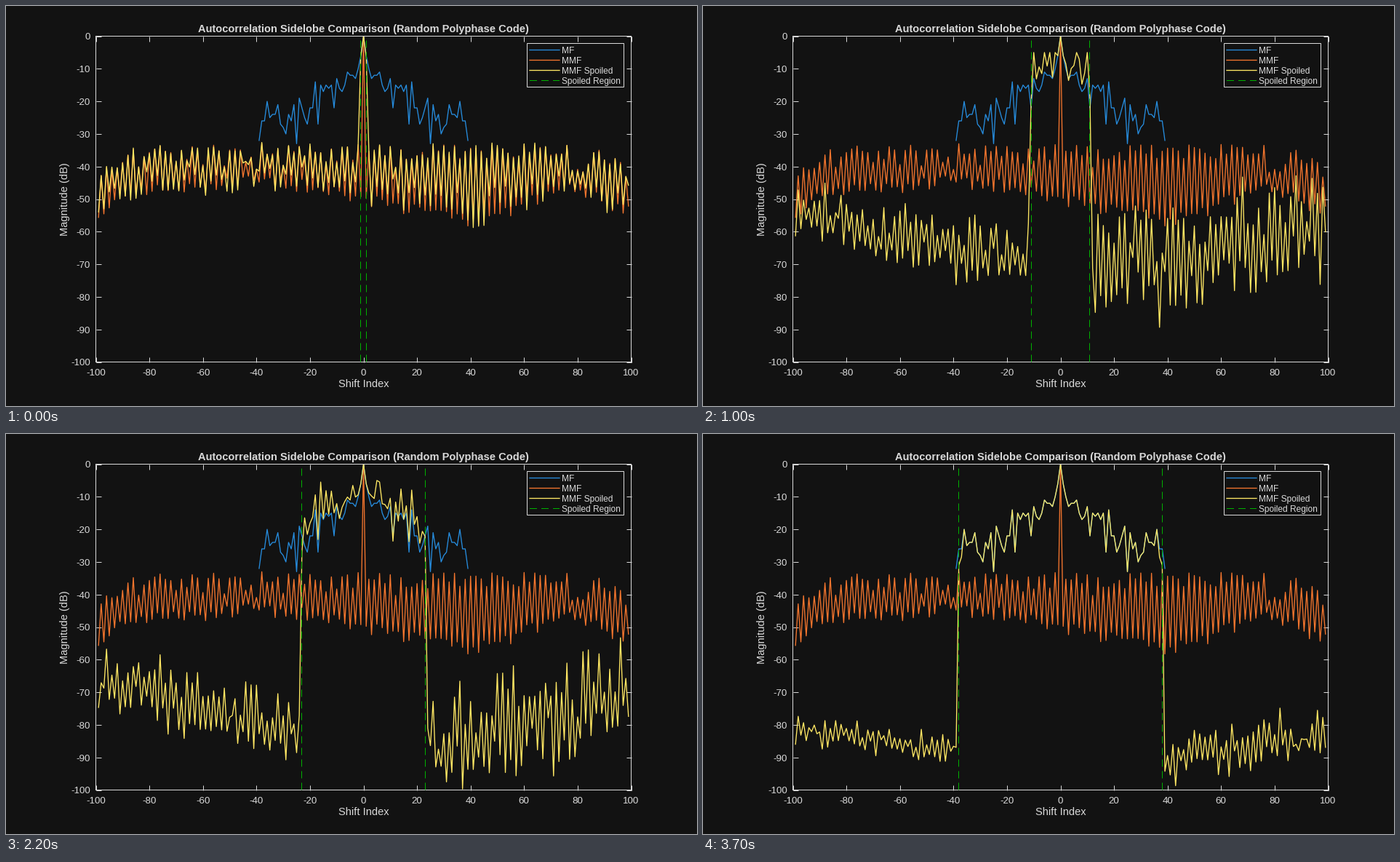
A matplotlib script for the animation above (3.8 s loop, 950 by 550 pixels).

```python
import numpy as np
import matplotlib.pyplot as plt
from matplotlib.animation import FuncAnimation
from matplotlib.patches import Rectangle

W, H = 950, 550
PX = 0.72  # one pixel in points at 100 dpi
BG, FG = "#121212", "#d9d9d9"
BLUE, ORANGE, YELLOW, GREEN = "#268cdd", "#f5762e", "#ffe864", "#00b000"
LEFT, RIGHT, TOP, BOTTOM = 123.5, 859.5, 41.5, 489.5
CENTER, STEP = (LEFT + RIGHT) / 2, (RIGHT - LEFT) / 200
STEPS = 38

plt.rcParams["font.family"] = "Liberation Sans"
rng = np.random.default_rng(12)
shift = np.arange(-99, 100)
lag = abs(shift)
even = shift % 2 == 0

# Matched filter: dB at shifts 0..39, mirrored around the peak.
mf_half = [0, -6, -10, -13, -12, -12, -11, -15, -17, -16,
           -13, -22, -15, -16, -15, -17, -15, -27, -14, -22,
           -22, -27, -25, -22, -19, -33, -21, -26, -24, -30,
           -28, -27, -21, -24, -24, -25, -20, -26, -26, -32]
mf = np.interp(lag, range(40), mf_half)
in_mf = lag < 40

# Mismatched filter: uneven teeth on even shifts over a smooth floor.
floor = np.interp(shift, [-99, -92, -52, -35, 0, 42, 78, 99],
                  [-55, -49, -45, -45, -50, -56.5, -46, -54])
teeth = -33 - 3.5 * abs(rng.normal(size=shift.size)) - 7 * (lag / 99) ** 12
mmf = np.where(even, np.maximum(teeth, floor), floor + rng.normal(size=shift.size))
mmf[lag == 0] = 0

ripples = np.clip(rng.normal(size=(8, shift.size)), -2, 2)


def ripple(half):
    """Noise that drifts slowly as the spoiled region widens."""
    i, t = divmod((half - 1) / 6, 1)
    angle = t * np.pi / 2
    return np.cos(angle) * ripples[int(i)] + np.sin(angle) * ripples[int(i) + 1]


def spoiled_curve(half):
    noise = ripple(half)
    # Outside, the floor sinks with the width, most of all near the region.
    near = np.interp(half, [1, 7, 15, 29, 38], [-38, -54, -74, -84, -87])
    far = np.interp(half, [1, 7, 15, 34, 38], [-38, -41, -55, -67, -79])
    depth = np.interp(half, [1, 7, 29, 38], [9, 14, 15, 7])
    depth = depth * (1 + 0.25 * np.sign(shift))
    outside = near + (far - near) * (lag / 99) ** 1.4
    outside = outside - np.where(even, 0, depth) + 0.3 * depth * noise
    start = np.clip((7 - half) / 6, 0, 1)
    echo = mmf + np.where(even, 0.4, 3) * noise + np.where(even, 0, 2)
    outside = start * echo + (1 - start) * outside

    # Inside, the lifted and rippled lobe settles onto the matched filter.
    rest = 1 - half / STEPS
    lift = rest * (9 + 6 * noise) + rest ** 2 * np.where(even, 4, -7)
    edge = 5 * half / STEPS * np.clip((lag - half + 2) / 2, 0, 1)
    inside = np.minimum(mf + lift * np.clip((lag - 1) / 3, 0, 1) - edge, -5)
    return np.where(lag == 0, 0, np.where(lag <= half, inside, outside))


fig = plt.figure(figsize=(9.5, 5.5), dpi=100, facecolor=BG)
ax = fig.add_axes([LEFT / W, 1 - BOTTOM / H, (RIGHT - LEFT) / W,
                   (BOTTOM - TOP) / H], facecolor=BG)
ax.set(xlim=(-100, 100), ylim=(-100, 0), xticks=range(-100, 101, 20),
       yticks=range(-100, 1, 10))
ax.tick_params(direction="in", length=7.36 * PX, width=PX, color=FG,
               top=True, right=True, labelbottom=False, labelleft=False)
for spine in ax.spines.values():
    spine.set(color=FG, linewidth=PX, snap=False)

# Overlay in pixel coordinates for text, legend and region edges.
page = fig.add_axes([0, 0, 1, 1], zorder=5)
page.set(xlim=(0, W), ylim=(H, 0))
page.axis("off")

solid = dict(linewidth=1.33 * PX, solid_joinstyle="round")
dashed = dict(linewidth=PX, linestyle=(0, (10, 6)), dash_capstyle="butt")


def label(x, y, text, size, **style):
    page.text(x, y, text, fontsize=size * PX, color=FG, va="baseline",
              rotation_mode="anchor", **style)


label(CENTER, 36, "Autocorrelation Sidelobe Comparison (Random Polyphase Code)",
      14.67, ha="center", weight="bold")
label(CENTER, 524, "Shift Index", 14.67, ha="center")
label(85, 265.5, "Magnitude (dB)", 14.67, ha="center", rotation=90)
for v in range(-100, 101, 20):
    label(CENTER + STEP * v, 508, str(v), 13.33, ha="center")
for v in range(-100, 1, 10):
    label(116, TOP - v * (BOTTOM - TOP) / 100 + 5, str(v), 13.33, ha="right")

ax.plot(shift[in_mf], mf[in_mf], color=BLUE, **solid)
ax.plot(shift, mmf, color=ORANGE, **solid)
spoiled, = ax.plot(shift, spoiled_curve(1), color=YELLOW, **solid)
edges = [page.plot([0, 0], [BOTTOM, TOP], color=GREEN, snap=False, **dashed)[0]
         for _ in range(2)]

page.add_patch(Rectangle((716.5, 51.5), 133, 60, facecolor=BG, edgecolor=FG,
                         linewidth=PX, snap=False, zorder=3))
entries = [("MF", BLUE, solid), ("MMF", ORANGE, solid),
           ("MMF Spoiled", YELLOW, solid), ("Spoiled Region", GREEN, dashed)]
for row, (name, color, style) in enumerate(entries):
    y = 60.5 + 14 * row
    page.plot([720, 761], [y, y], color=color, snap=False, zorder=4, **style)
    label(764, y + 4.5, name, 12, zorder=4)


def update(frame):
    half = frame + 1
    spoiled.set_ydata(spoiled_curve(half))
    for line, x in zip(edges, (-half, half)):
        pixel = np.floor(CENTER + STEP * x) + 0.5
        line.set_xdata([pixel, pixel])
    return [spoiled, *edges]


anim = FuncAnimation(fig, update, frames=STEPS, interval=100, repeat=True)
plt.show()
```
